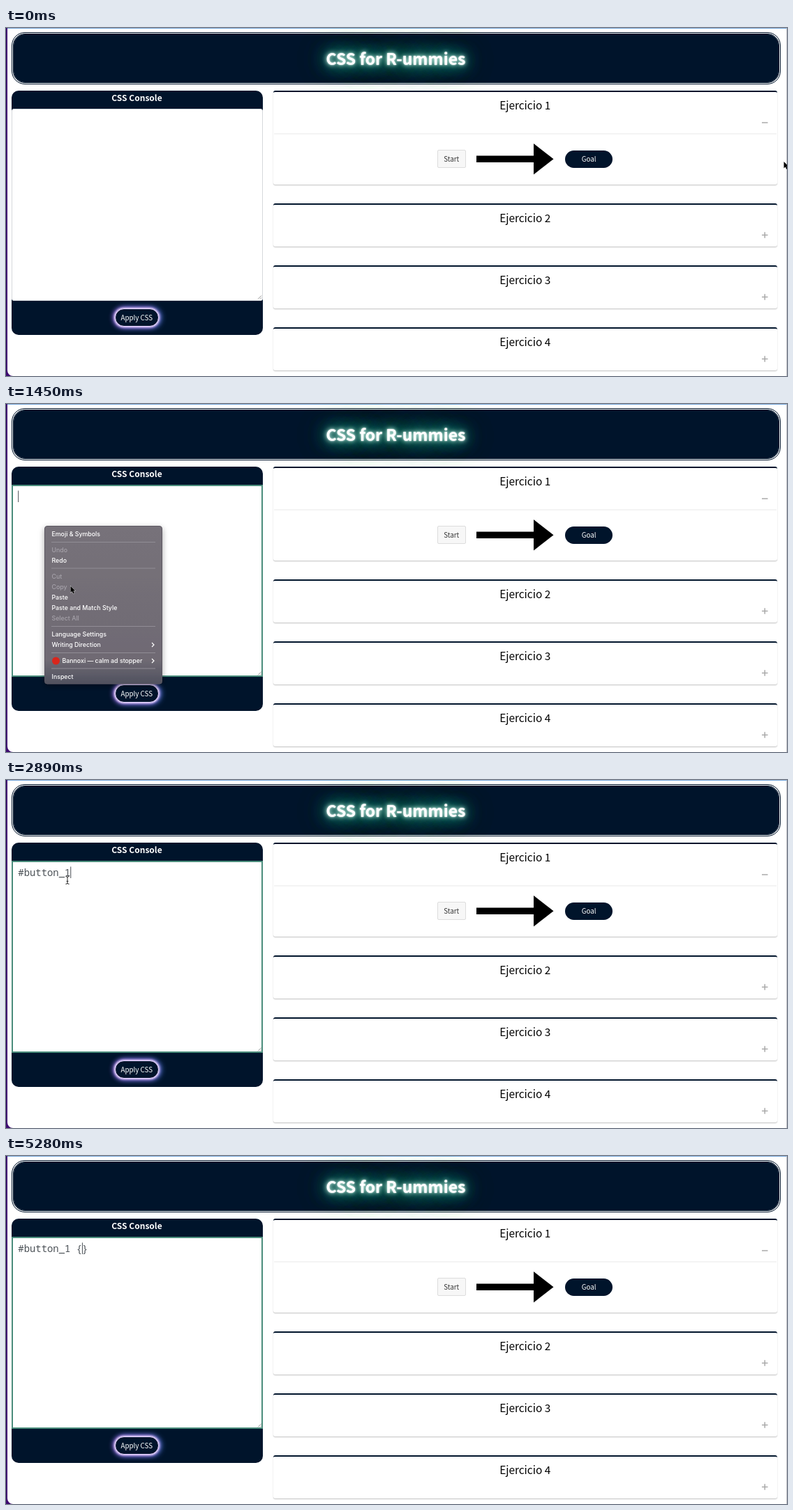
These frames come from a looping animation (1119x500 px, 5.86 s). An HTML page:

```html
<!DOCTYPE html>
<html lang="es">
<head>
<meta charset="utf-8">
<title>CSS Console</title>
<style>
  :root { --navy: #00142b; --teal: #4b8d7c; }
  html, body { margin: 0; width: 100%; height: 100%; overflow: hidden; background: #3d0a70; }
  #stage { position: relative; width: 1119px; height: 500px; overflow: hidden;
    font-family: "Noto Sans CJK JP", "Noto Sans CJK SC", "Noto Sans CJK", "Noto Sans", sans-serif; }
  #stage div, svg { position: absolute; box-sizing: border-box; }
  #page { left: 2px; top: 0; width: 1117px; height: 500px; background: #fff;
    border-top: 1px solid #78a9dc; border-right: 1px solid #c4c4c8; border-bottom-left-radius: 8px; }
  #banner { left: 8px; top: 6px; width: 1102px; height: 75px; border: 3px double #fff; border-radius: 19px;
    background: var(--navy); border-color: var(--navy); background-clip: padding-box; }
  #title { left: 8px; top: 29px; width: 1101px; height: 28px; line-height: 28px; text-align: center;
    font-size: 23px; font-weight: 700; color: #fff; white-space: nowrap;
    text-shadow: 0 0 2px #fff, 0 0 6px #d4fff2, 0 0 12px #4fb296, 0 0 24px #2e8f78,
      0 0 24px #2e8f78, 0 0 42px #2a8672, 0 0 42px #2a8672; }
  #console { left: 8px; top: 90px; width: 360px; height: 351px; border-radius: 10px; background: var(--navy); }
  #editor { left: 8px; top: 116px; width: 359.5px; height: 275.5px; border-radius: 3px; background: #fff;
    border: 1px solid #d5d8dc; }
  #editor.focus { border: 2px solid var(--teal); border-radius: 1px; }
  #apply { left: 156px; top: 403px; width: 63px; height: 26px; border-radius: 13px; background: var(--navy);
    border: 1px solid #e6d3ff;
    box-shadow: 0 0 3px 1px #f1e4ff, -1px 0 7px 1px #b46bf0, 2px 0 9px 1px #4f86e8; }
  .card { left: 383px; width: 722px; border-radius: 3px; background: #fff; border-top: 2px solid var(--navy);
    box-shadow: 0 1px 1.5px rgba(0, 0, 0, .25); }
  #start { left: 618px; top: 175px; width: 41px; height: 26px; border: 1px solid #ddd; border-radius: 2px; background: #f7f7f7; }
  #goal { left: 801px; top: 175.5px; width: 68px; height: 25px; border-radius: 12.5px; background: var(--navy); }
  svg { left: 0; top: 0; }
  .mid { text-anchor: middle; }
  .label { font-size: 9.8px; font-weight: 500; }
  .mono { font: 13.9px "Noto Sans Mono", "DejaVu Sans Mono", monospace; fill: #4c5257; white-space: pre; }
  #menu text { font: 500 8.8px Inter, Roboto, sans-serif; fill: #fff; }
  #menu text.off { fill: #a5a1a9; }
</style>
</head>
<body>
<div id="stage">
  <div id="page"></div>
  <div id="banner"></div>
  <div id="title">CSS for R-ummies</div>
  <div id="console"></div>
  <div id="editor"></div>
  <div id="apply"></div>
  <div class="card" style="top:90px;height:135px"></div>
  <div class="card" style="top:252px;height:62px"></div>
  <div class="card" style="top:341px;height:62px"></div>
  <div class="card" style="top:430px;height:62px"></div>
  <div id="start"></div>
  <div id="goal"></div>
  <svg width="1119" height="500" viewBox="0 0 1119 500">
    <defs>
      <linearGradient id="glass" x1="0" y1="0" x2="0" y2="1">
        <stop offset="0" stop-color="#77727a"/>
        <stop offset=".85" stop-color="#6f6a73"/>
        <stop offset="1" stop-color="#50515f"/>
      </linearGradient>
      <filter id="shade" x="-20%" y="-20%" width="140%" height="140%">
        <feDropShadow dx="0" dy="3" stdDeviation="4" flood-opacity=".35"/>
      </filter>
    </defs>
    <text class="mid" x="187.5" y="105.2" font-size="12" font-weight="700" fill="#fff">CSS Console</text>
    <text class="mid label" x="187.3" y="420" fill="#fff">Apply CSS</text>
    <g id="cards"></g>
    <path d="M384 152H1104" stroke="#e8e8e8"/>
    <text class="mid label" x="638.2" y="192" fill="#333">Start</text>
    <path d="M674 183.5H756V166L784.5 188.2L756 210.5V193H674Z"/>
    <text class="mid label" x="835.2" y="192" fill="#fff">Goal</text>
    <path d="M361 389.5L366 384.5M364 389.5L366 387.5" stroke="#777" stroke-width=".8"/>
    <text id="code" class="mono" x="17.3" y="137.6" xml:space="preserve"></text>
    <rect id="caret" y="124.5" width="1" height="16.5" fill="#4c5257"/>
    <g id="menu">
      <rect x="55.5" y="175.5" width="168" height="226.5" rx="3.5" fill="url(#glass)" stroke="#5d5962" filter="url(#shade)"/>
      <rect id="hover" x="59.5" width="160" height="15" rx="2.5" fill="#3f78d6"/>
    </g>
    <path id="arrow" d="M0 0V9.6L2.2 7.6L3.7 11L5.4 10.3L3.9 7H6.9Z" stroke="#fff" stroke-width=".8" paint-order="stroke"/>
    <path id="beam" d="M-2.5-5.5Q0-5.5 0-4Q0-5.5 2.5-5.5M0-4V4M-2.5 5.5Q0 5.5 0 4Q0 5.5 2.5 5.5M-1.3 1.5H1.3" fill="none" stroke="#222"/>
  </svg>
</div>
<script>
const LOOP = 5860;
const $ = id => document.getElementById(id);
const show = (el, on) => el.style.display = on ? "" : "none";

function add(parent, tag, attrs, text = "") {
  const el = document.createElementNS("http://www.w3.org/2000/svg", tag);
  for (const key in attrs) el.setAttribute(key, attrs[key]);
  el.textContent = text;
  parent.append(el);
}

[90.5, 252, 341, 430].forEach((top, i) => {
  add($("cards"), "text", { class: "mid", x: 743.7, y: top + 26.6, "font-size": 15.4 }, `Ejercicio ${i + 1}`);
  const y = top + 45.5;
  add($("cards"), "path", { d: `M1083 ${y}h8.5` + (i ? `M1087.2 ${y - 4.2}v8.5` : ""), stroke: "#aaa", "stroke-width": 1.5 });
});

// label, centre y, enabled
const items = [
  ["Emoji & Symbols", 187, 1], ["Undo", 210, 0], ["Redo", 225, 1],
  ["Cut", 247.5, 0], ["Copy", 262.8, 0], ["Paste", 278, 1],
  ["Paste and Match Style", 293, 1], ["Select All", 308, 0],
  ["Language Settings", 331, 1], ["Writing Direction", 346, 1],
  ["Bannoxi — calm ad stopper", 369, 1], ["Inspect", 391.3, 1]
];
for (const [label, y, on] of items)
  add($("menu"), "text", { x: y === 369 ? 80.5 : 65.5, y: y + 3.2, class: on ? "" : "off" }, label);
for (const y of [198.5, 236, 319.5, 357.5, 380])
  add($("menu"), "path", { d: `M65 ${y}H214`, stroke: "#918d95" });
for (const y of [346, 369])
  add($("menu"), "path", { d: `M209 ${y - 3}l3 3l-3 3`, fill: "none", stroke: "#fff", "stroke-width": 1.2 });
add($("menu"), "circle", { cx: 71.5, cy: 369, r: 5.5, fill: "#d9261c" });

// pointer moves: start, end, steps, from, to
const moves = [
  [80, 740, 8, [1114.5, 192], [54.8, 178]],
  [1040, 1450, 5, [54.8, 178], [92.5, 261.5]],
  [1530, 1770, 3, [92.5, 261.5], [88, 272.5]],
  [2250, 2250, 1, [88, 272.5], [88.5, 265.5]],
  [2330, 2890, 7, [88.5, 265.5], [88, 144]]
];
// time, text, caret column
const typing = [
  [0, "", -1], [970, "", 0], [2250, "#button_1", 9], [3310, "#button_1 ", 10],
  [3950, "#button_1 {", 11], [4210, "#button_1 {}", 12], [5280, "#button_1 {}", 11]
];

function pointerAt(t) {
  let pos = moves[0][3];
  for (const [start, end, steps, from, to] of moves) {
    if (t < start) break;
    const step = end > start ? Math.floor((t - start) / (end - start) * steps) + 1 : steps;
    const p = Math.min(1, step / steps);
    const ease = p * p * (3 - 2 * p);
    pos = from.map((v, i) => v + (to[i] - v) * ease);
  }
  return pos;
}

function render(t) {
  const [x, y] = pointerAt(t);
  const menuOpen = t >= 970 && t < 2250;
  const [, text, column] = typing.findLast(row => row[0] <= t);

  $("editor").className = column < 0 ? "" : "focus";
  $("code").textContent = text;
  show($("caret"), column >= 0);
  $("caret").setAttribute("x", 17.2 + 8.34 * column);

  show($("menu"), menuOpen);
  const hovered = items.find(item => item[2] && Math.abs(item[1] - y) < 7.5);
  show($("hover"), hovered);
  if (hovered) $("hover").setAttribute("y", hovered[1] - 7.5);

  show($("arrow"), t < 2250);
  show($("beam"), t >= 2250 && t < 3310);
  for (const id of ["arrow", "beam"]) $(id).setAttribute("transform", `translate(${x} ${y})`);
}

const began = performance.now();
function tick() {
  render((performance.now() - began) % LOOP);
  requestAnimationFrame(tick);
}
tick();
</script>
</body>
</html>
```
